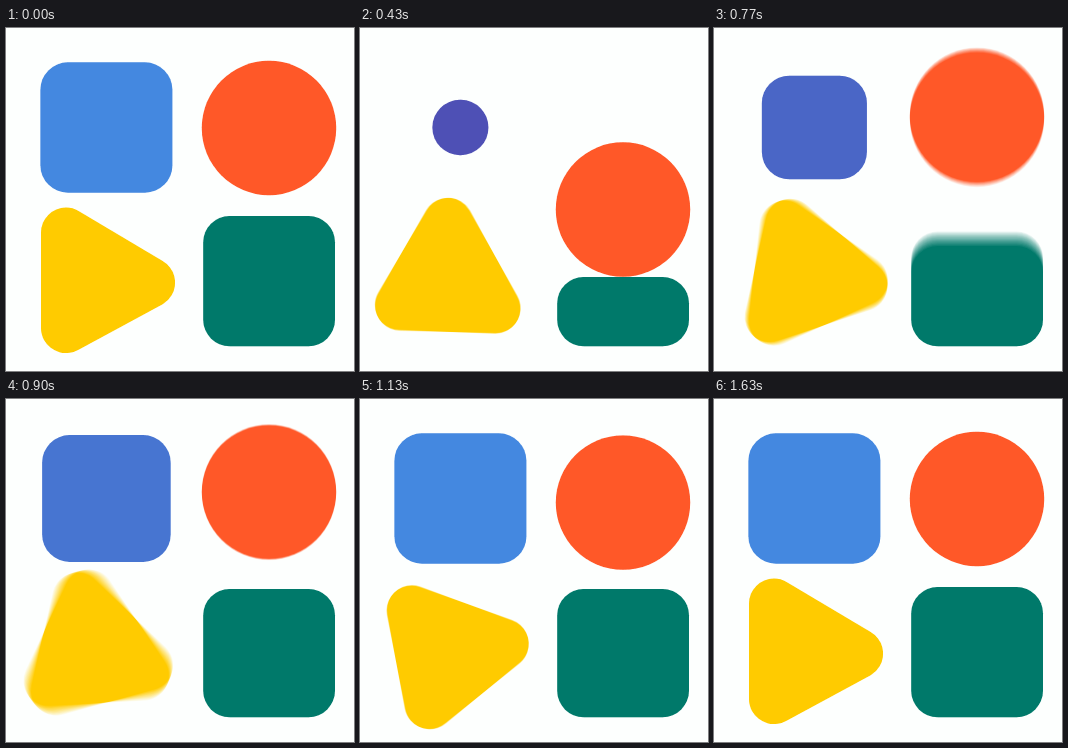
Animation, 348 px wide and 343 px high, one loop 1.66 s. Source, as an HTML page with a canvas:

```html
<!DOCTYPE html>
<html lang="en">
<head>
<meta charset="utf-8">
<title>Bouncing shapes</title>
<style>
  html, body { margin: 0; width: 100%; height: 100%; overflow: hidden; background: #fdfffe; }
  canvas { display: block; }
</style>
</head>
<body>
<canvas id="stage" width="348" height="343"></canvas>
<script>
const LOOP = 1660, STEP = 100 / 3, SHUTTER = 16, SAMPLES = 15;
const stage = document.getElementById('stage');
const ctx = stage.getContext('2d');
const mask = document.createElement('canvas');
mask.width = stage.width;
mask.height = stage.height;
const pen = mask.getContext('2d');

const linear = u => u;
const easeIn = power => u => u ** power;
const easeOut = power => u => 1 - (1 - u) ** power;
const smooth = u => u * u * (3 - 2 * u);
const snap = u => u < .5 ? 4 * u ** 3 : 1 - 4 * (1 - u) ** 3;

// A resting value followed by eased moves: [from time, to time, new value, easing].
const track = (rest, ...moves) => t => moves.reduce((value, [from, to, next, ease]) =>
  value + (next - value) * ease(Math.min(1, Math.max(0, (t - from) / (to - from)))), rest);

// Ball drops onto the pad, is thrown above its place, then sinks back.
const ballY = track(100, [82, 372, 181.5, snap], [600, 825, 82, snap],
  [825, 1075, 103.8, easeOut(2)], [1075, 1500, 100, smooth]);
const padTop = track(188, [82, 372, 249, snap], [688, 828, 190, snap], [1133, 1400, 188, smooth]);
const boxHalf = track(66, [30, 433, 28, easeIn(2.2)], [625, 975, 66, easeOut(2)]);
const boxTint = track(0, [30, 433, 1, linear], [570, 1070, 0, linear]);
const spin = track(0, [30, 545, 45, easeIn(1.63)], [545, 733, 136, smooth],
  [733, 982, -21, smooth], [982, 1290, 0, smooth]);

const BLUE = [68, 136, 224], INDIGO = [78, 80, 181];
const mix = u => `rgb(${BLUE.map((c, i) => Math.round(c + (INDIGO[i] - c) * u))})`;

function box(t) {
  const w = boxHalf(t), h = w * .987;
  pen.roundRect(100.4 - w, 99.5 - h, 2 * w, 2 * h, Math.min(27.5, h));
}

function ball(t) {
  pen.arc(263, ballY(t), 67.2, 0, 2 * Math.PI);
}

function pad(t) {
  const top = padTop(t);
  pen.roundRect(197.2, top, 131.8, 318.2 - top, 26.5);
}

// Rounded corners placed around a pivot slightly off the middle.
function triangle(t) {
  const turn = spin(t) * Math.PI / 180, third = Math.PI / 3;
  const cos = Math.cos(turn), sin = Math.sin(turn);
  [[52.1, 3], [-32, 48.4], [-32, -47]].forEach(([x, y], i) => {
    const facing = turn + i * 2 * third;
    pen.arc(92 + x * cos - y * sin, 251.6 + x * sin + y * cos, 25, facing - third, facing + third);
  });
  pen.closePath();
}

// Averages the shape over the open shutter, then tints the result.
function paint(shape, color, t, shutter = SHUTTER) {
  pen.globalCompositeOperation = 'source-over';
  pen.clearRect(0, 0, mask.width, mask.height);
  pen.globalCompositeOperation = 'lighter';
  pen.globalAlpha = 1 / SAMPLES;
  pen.fillStyle = '#fff';
  for (let i = 0; i < SAMPLES; i++) {
    pen.beginPath();
    shape(t + shutter * ((i + .5) / SAMPLES - .5));
    pen.fill();
  }
  pen.globalCompositeOperation = 'source-in';
  pen.globalAlpha = 1;
  pen.fillStyle = color;
  pen.fillRect(0, 0, mask.width, mask.height);
  ctx.drawImage(mask, 0, 0);
}

function draw(t) {
  ctx.fillStyle = '#fdfffe';
  ctx.fillRect(0, 0, stage.width, stage.height);
  paint(box, mix(boxTint(t)), t, 0);
  paint(triangle, '#ffcb00', t);
  paint(pad, '#00796a', t);
  paint(ball, '#ff5828', t);
}

const start = performance.now();
function tick() {
  const elapsed = (performance.now() - start) % LOOP;
  // Thirty poses a second, each starting on a whole hundredth.
  draw(Math.floor((Math.floor(elapsed / 10) * 10 + 4) / STEP) * STEP);
  requestAnimationFrame(tick);
}
tick();
</script>
</body>
</html>
```
